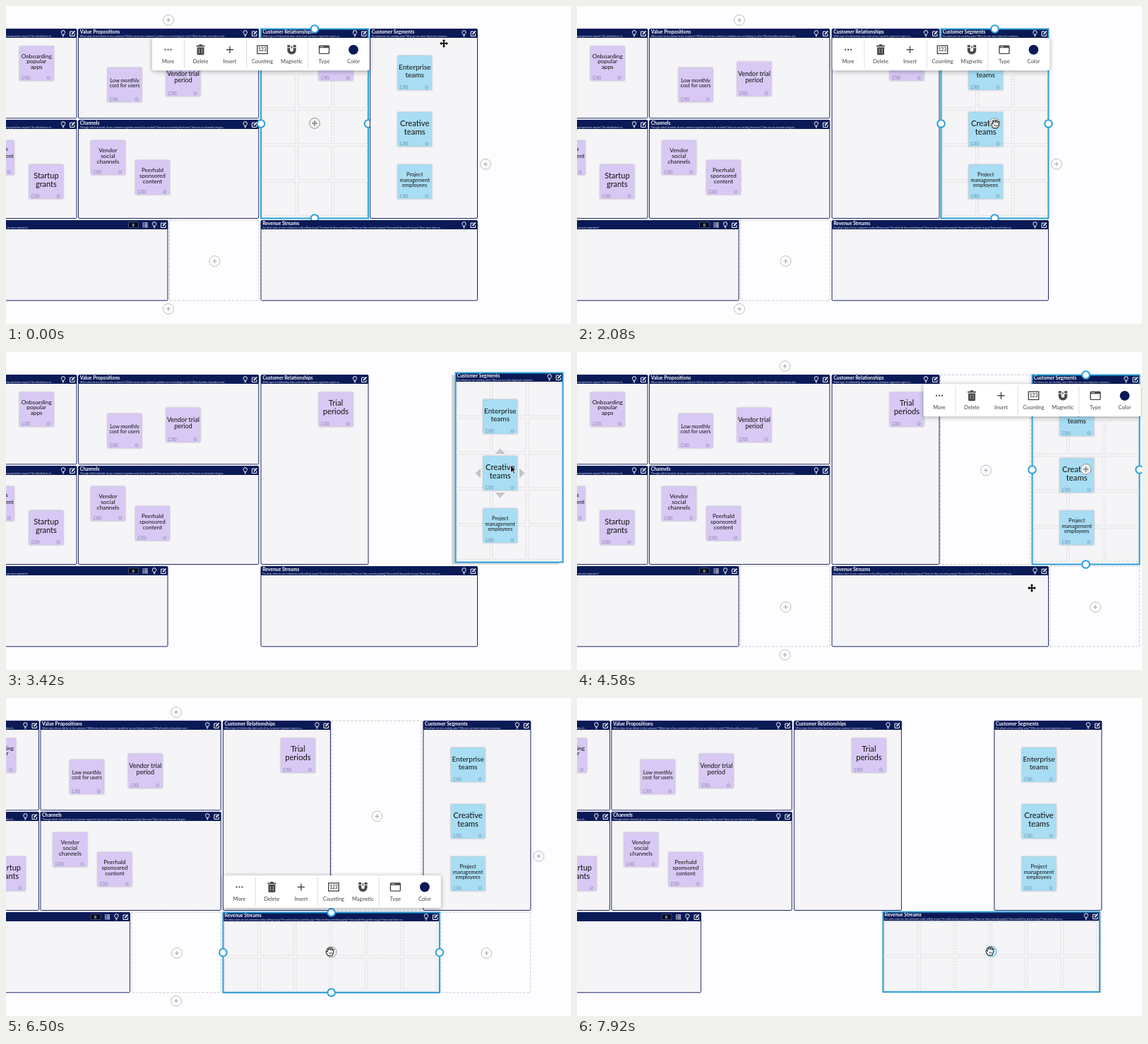
Animation of 800 by 450 pixels, one loop 8 s. Source, as an HTML page:

```html
<!DOCTYPE html>
<html lang="en">
<head>
<meta charset="utf-8">
<title>Business model board</title>
<style>
  html, body { margin: 0; width: 100%; height: 100%; overflow: hidden; background: #fdfcfe; }
  svg { display: block; width: 800px; height: 450px; font-family: Lato, "Open Sans", sans-serif; }
  .body { fill: #f5f4f6; stroke: #1c2766; }
  .head { fill: #0a1a57; }
  .title { font-size: 6.8px; font-weight: 700; fill: #fff; }
  .sub { font-size: 3.4px; fill: #dfe2ef; }
  .cell { fill: none; stroke: #d3d2d6; stroke-width: .8; stroke-dasharray: 2.4 1.6; }
  .slot { fill: none; stroke: #c6c4ca; stroke-width: .9; stroke-dasharray: 3.5 2; }
  .note { filter: drop-shadow(0 .6px 1px rgba(40, 30, 70, .4)); }
  .note-text { fill: #111; text-anchor: middle; }
  .mini { fill: none; stroke: rgba(50, 50, 90, .38); stroke-width: .7; }
  .outline { fill: none; stroke: #2ba0d8; stroke-width: 2; }
  .handle { fill: #fff; stroke: #2ba0d8; stroke-width: 2; }
  .add { fill: #fdfcfe; stroke: #b5b4ba; stroke-width: .9; }
  .grip { fill: #f0f0f1; stroke: #88888d; stroke-width: .9; }
  .dragging .grip { fill: #c9eaf8; stroke: #2ba0d8; }
  .bar { fill: #fff; filter: drop-shadow(0 1px 3px rgba(0, 0, 0, .35)); }
  .label { font-size: 7.5px; fill: #444; text-anchor: middle; }
  .tool { fill: #4a4a4c; }
  .line { fill: none; stroke: #4a4a4c; stroke-width: 1.4; }
  .white { fill: none; stroke: #fff; stroke-width: 1; }
</style>
</head>
<body>
<svg id="stage" viewBox="0 0 800 450">
  <defs>
    <g id="bulb" class="white">
      <path d="M-1.2 1.6C-1.2.7-2.7.1-2.7-1.5A2.7 2.7 0 0 1 2.7-1.5C2.7.1 1.2.7 1.2 1.6Z"/>
      <path d="M-1.2 3H1.2M-.7 4.2H.7"/>
    </g>
    <g id="edit" class="white">
      <path d="M.8-2.8H-3.4V3.6H3V.2"/>
      <path d="M-1 1.2L3.4-3.4" stroke-width="1.7"/>
    </g>
    <g id="list" class="white">
      <path d="M-3.4-2.6H-2M-3.4 0H-2M-3.4 2.6H-2M-1-2.6H3.5M-1 0H3.5M-1 2.6H3.5" stroke-width="1.6"/>
      <path d="M1-3.5V3.5" stroke="#0a1a57" stroke-width=".6"/>
    </g>
    <g id="plus"><circle class="add" r="7.4"/><path d="M-3 0H3M0-3V3" stroke="#a4a3a9"/></g>
    <path id="cross" d="M0-6L2.4-3.3H.9V-.9H3.3V-2.4L6 0L3.3 2.4V.9H.9V3.3H2.4L0 6L-2.4 3.3H-.9V.9H-3.3V2.4L-6 0L-3.3-2.4V-.9H-.9V-3.3H-2.4Z"/>
  </defs>
  <g id="world">
    <g id="board"></g>
    <g id="before"></g>
    <g id="after"></g>
    <rect id="drop" fill="#d2d2d5"/>
    <g id="moving"></g>
    <g id="toolbar"></g>
  </g>
  <g id="cursor">
    <use data-kind="move" href="#cross" fill="#111" stroke="#fff" stroke-width="1.2" paint-order="stroke"/>
    <g data-kind="hand">
      <path d="M-3 6.3L-5.9 1.5Q-6.6-.3-5-.5L-3.5 1L-4.6-3.3Q-4.2-5-3-4L-2-1.5L-2.1-5Q-1-6.7 0-5L.3-1.5L1.2-4.8Q2.5-5.9 2.9-4.3L2.6-1L3.8-3Q5.3-3.5 5-2L4.4 2.6L3 6.3Z" fill="#fff" stroke="#111" stroke-linejoin="round"/>
      <path d="M-1 1.5V4M.7 1.5V4M2.3 1.5V4" stroke="#111" stroke-width=".7"/>
    </g>
    <path data-kind="arrow" d="M0-4V7L2.5 4.7L4.2 8.5L6 7.7L4.3 4H7.6Z" fill="#111" stroke="#fff" stroke-width=".8"/>
    <g data-kind="pointer">
      <path d="M-2.6-5.4Q-1.5-6.6-.5-5.4V-1.6L3.4-.8Q5.2-.3 4.8 1.8L4 6.4H-1.6L-4.6 2Q-4.8.4-3.2.8L-2.2 1.6Z" fill="#fff" stroke="#111" stroke-linejoin="round"/>
      <path d="M-.2 2.4V5M1.3 2.4V5M2.8 2.4V5" stroke="#111" stroke-width=".7"/>
    </g>
  </g>
</svg>
<script>
const $ = id => document.getElementById(id);
const range = n => [...Array(n).keys()];
const use = (id, x, y) => `<use href="#${id}" x="${x}" y="${y}"/>`;
const rect = (cls, x, y, w, h, more = '') =>
  `<rect class="${cls}" x="${x}" y="${y}" width="${w}" height="${h}" ${more}/>`;

const PURPLE = '#d7c8f4', BLUE = '#a8ddf3';

function note(x, y, fill, size, lead, ...lines) {
  const text = lines.map((line, i) => {
    const base = y + 21.7 + (i - (lines.length - 1) / 2) * lead + size * .33;
    return `<text class="note-text" x="${x + 24.2}" y="${base}" font-size="${size}">${line}</text>`;
  }).join('');
  return rect('note', x, y, 48.4, 48.4, `fill="${fill}"`) + text +
    `<g class="mini" transform="translate(${x} ${y + 44.5})">
      <path d="M4-2H9V1.5H6.5L4 2.6ZM10.3-2H14.3V2H10.3ZM11.3 0H13.3"/>
      <circle cx="41.3" r="2.2"/><path d="M40.3 0L41.1.8L42.4-.7"/></g>`;
}

// Panels without a title run off the left edge, so their text is anchored at its end.
function panel({ x, y, w, h, title = '', sub, subEnd, cells, notes = '', extra = '' }) {
  const right = x + w, mid = y + 6.4;
  const caption = subEnd
    ? `<text class="sub" x="${subEnd}" y="${y + 11.3}" text-anchor="end">${sub}</text>`
    : `<text class="sub" x="${x + 2.2}" y="${y + 11.3}">${sub}</text>`;
  const grid = cells ? `<g class="grid">${range(cells[0] * cells[1]).map(i =>
    rect('cell', x + 2 + i % cells[0] * 50.7, y + 13.6 + Math.floor(i / cells[0]) * 50.8, 47, 47)).join('')}</g>` : '';
  const cx = x + w / 2, cy = y + h / 2;
  const select = cells ? `<g class="select">${rect('outline', x, y, w, h)}
    <g class="grip-group" transform="translate(${cx} ${cy - .6})"><circle class="grip" r="7.4"/>
      <use href="#cross" fill="#77777c" transform="scale(.65)"/></g>
    <g class="handles">${[[cx, y], [x, cy], [right, cy], [cx, y + h]].map(([a, b]) =>
      `<circle class="handle" cx="${a}" cy="${b}" r="5.3"/>`).join('')}</g></g>` : '';
  return rect('body', x, y, w, h, 'rx="1.5"') + rect('head', x, y, w, 12.6, 'rx="1"') +
    `<text class="title" x="${x + 2.2}" y="${y + 6.7}">${title}</text>` + caption +
    use('bulb', right - 19, mid) + use('edit', right - 6, mid) + extra + grid + notes + select;
}

const counter = rect('', 173.5, 305.7, 14, 8, 'rx="1" fill="#060b20" stroke="#6a739c" stroke-width=".6"') +
  '<text class="title" x="178.7" y="311.8" font-size="5" style="font-size:5px">0</text>' + use('list', 197, 309.9);

const relations = { x: 361, y: 32.5, w: 152, h: 268, cells: [3, 5], title: 'Customer Relationships',
  sub: 'What type of relationship does each of our customer segments expect us...',
  notes: note(442.8, 57, PURPLE, 11.2, 11.8, 'Trial', 'periods') };
const segments = { x: 515.5, y: 32.5, w: 152, h: 268, cells: [3, 5], title: 'Customer Segments',
  sub: 'For whom are we creating value? Who are our most important customer...',
  notes: note(554.5, 70.3, BLUE, 10.1, 11, 'Enterprise', 'teams') +
    note(554.5, 150.3, BLUE, 11.3, 11.6, 'Creative', 'teams') +
    note(554.5, 224.5, BLUE, 7.5, 7.5, 'Project', 'management', 'employees') +
    '<path id="arrows" fill="#c4c4c9" d="M571.7 147H585.7L578.7 139.5ZM571.7 202H585.7L578.7 209.5ZM551 167.5V181.5L543.5 174.5ZM606 167.5V181.5L613.5 174.5Z"/>' };
const revenue = { x: 361, y: 303.5, w: 306.5, h: 113.3, cells: [6, 2], title: 'Revenue Streams',
  sub: 'For what value are our customers really willing to pay? For what do they currently pay? How are they currently paying? How would they prefer to pay? How much does ea...' };
const keySub = 'What key activities do our value propositions require? Our distribution ch...';

$('board').innerHTML = [
  { x: -155, y: 32.5, w: 255, h: 126.3, sub: keySub, subEnd: 66,
    notes: note(19, 57, PURPLE, 8.3, 7.9, 'Onboarding', 'popular', 'apps') },
  { x: -155, y: 161.5, w: 255, h: 139, sub: keySub, subEnd: 66,
    notes: note(-37, 190.4, PURPLE, 8.2, 10, 'Business', 'development', '') +
      note(32.7, 224.4, PURPLE, 11, 11.8, 'Startup', 'grants') },
  { x: 102.5, y: 32.5, w: 255.3, h: 126.3, title: 'Value Propositions',
    sub: "What value do we deliver to the customer? Which one of our customer's problems are we helping to solve? What bundles of products and...",
    notes: note(143.8, 87.4, PURPLE, 7.3, 7.6, 'Low monthly', 'cost for users') +
      note(226.7, 79, PURPLE, 9, 9.2, 'Vendor trial', 'period') },
  { x: 102.5, y: 161.5, w: 255.3, h: 139, title: 'Channels',
    sub: 'Through which channels do our customer segments want to be reached? How are we reaching them now? How are our channels integrat...',
    notes: note(120.2, 190.4, PURPLE, 8.3, 7.8, 'Vendor', 'social', 'channels') +
      note(183.3, 218.4, PURPLE, 8.1, 7.8, 'Peerhald', 'sponsored', 'content') },
  { x: -80, y: 303.5, w: 309, h: 113.3, extra: counter, subEnd: 31,
    sub: 'Which key resources are most expensive?' },
].map(panel).join('') + `<g id="relations">${panel(relations)}</g>`;
$('moving').innerHTML = `<g id="segments">${panel(segments)}</g><g id="revenue">${panel(revenue)}</g>`;

const firstSlot = rect('slot', 231.5, 303, 126.5, 113.8) + use('plus', 295.5, 361);
const edgeAdds = (middle, right) => use('plus', middle, 20) + use('plus', middle, 428.6) + use('plus', right, 223.8);
$('before').innerHTML = firstSlot + edgeAdds(230, 679);
$('after').innerHTML = firstSlot + edgeAdds(294.5, 808) +
  rect('slot', 514.5, 32.2, 127, 268.5) + use('plus', 579, 167.4) +
  rect('slot', 669.7, 303, 126.6, 113.8) + use('plus', 734, 361);

const tools = [
  ['More', 22.5, '<path class="tool" d="M-5-1H-3V1H-5ZM-1-1H1V1H-1ZM3-1H5V1H3Z"/>'],
  ['Delete', 68.5, '<path class="tool" d="M-6-6H-2.5L-1.8-7.5H1.8L2.5-6H6V-4.3H-6ZM-5-3.4H5V6Q5 7.4 3.6 7.4H-3.6Q-5 7.4-5 6Z"/><path d="M-2-1.5V5M2-1.5V5" stroke="#aaa"/>'],
  ['Insert', 110, '<path class="line" d="M-5 0H5M0-5V5"/>'],
  ['Counting', 156, '<rect class="line" x="-7.2" y="-5.6" width="14.4" height="11.2"/><text class="label" y="2.4" style="font-size:6.6px;font-weight:700">123</text>'],
  ['Magnetic', 197.5, '<path fill="none" stroke="#4a4a4c" stroke-width="4" d="M-4.2-6.5V.6A4.2 4.2 0 0 0 4.2.6V-6.5"/><path d="M-6.5-3H-2M2-3H6.5" stroke="#fff"/><path class="tool" d="M.5-7L-1.4-3H0L-.6 0L1.5-4H.2Z"/>'],
  ['Type', 243.5, '<rect class="line" x="-7" y="-5.4" width="14" height="11" rx="1"/><path class="tool" d="M-7-6H7V-2.5H-7Z"/><path d="M-5.5-4.2H-1" stroke="#fff" stroke-width=".8"/>'],
  ['Color', 285, '<circle r="6.9" fill="#0a1a57"/>'],
];
$('toolbar').innerHTML = rect('bar', 0, 0, 308, 46, 'rx="3"') +
  '<path d="M45.5 3V43M133.7 3V43M220.3 3V43" stroke="#dedde1"/>' +
  tools.map(([name, x, icon]) => `<g transform="translate(${x} 16.5)">${icon}<text class="label" y="19.5">${name}</text></g>`).join('');

const LOOP = 8000, DROP = 3600, SNAP = 12.9, LEAD = 60;
const panels = { relations, segments, revenue };
const segmentDrag = [[2200, 0, 0], [2500, 53, -1], [2950, 108, -3], [3250, 121, -3], [3420, 121, -3], [DROP, 124, -2]];
const revenueDrag = [[6850, 0, 0], [7170, 83, -1.5], [7580, 114, -1], [7820, 126, -.8]];
const cursorPath = [
  [120, 620, 53], [560, 606, 125], [1100, 592.5, 166.5], [DROP, 592.5, 166.5], [DROP, 716, 166],
  [3900, 716, 166], [4480, 644, 334], [4720, 644, 334], [5150, 575, 345], [5300, 575, 345],
  [5560, 608, 315], [5800, 608, 315], [6400, 459, 358.5],
];
const cursorKinds = [[0, 'move'], [1000, 'hand'], [3300, 'arrow'], [DROP, 'hand'], [3950, 'move'],
  [5450, 'pointer'], [5850, 'move'], [6300, 'hand']];

const linear = p => p, smooth = p => p * p * (3 - 2 * p);

function at(keys, t, ease = linear) {
  const next = keys.findIndex(k => k[0] > t);
  if (next === 0) return keys[0].slice(1);
  if (next < 0) return keys.at(-1).slice(1);
  const a = keys[next - 1], b = keys[next];
  const p = ease((t - a[0]) / (b[0] - a[0]));
  return [1, 2].map(i => a[i] + (b[i] - a[i]) * p);
}

const show = (el, on) => { el.style.display = on ? '' : 'none'; };
const place = (el, x, y) => el.setAttribute('transform', `translate(${x} ${y})`);

function render(t) {
  const selected = t < 520 ? 'relations' : t < 5280 ? 'segments' : 'revenue';
  const kind = cursorKinds.findLast(k => k[0] <= t)[1];
  const early = t >= 2200 && t < DROP, dragging = early || t >= 6850;
  const offsets = {
    relations: [0, 0],
    segments: t < DROP ? at(segmentDrag, t) : [10 * SNAP, 0],
    revenue: at(revenueDrag, t),
  };
  const camera = at([[4640, 0, 0], [5000, -53.6, 0]], t, smooth)[0];
  place($('world'), camera, 0);

  for (const name in panels) {
    const group = $(name);
    place(group, ...offsets[name]);
    group.classList.toggle('dragging', dragging);
    show(group.querySelector('.grid'), name === selected);
    show(group.querySelector('.select'), name === selected);
    show(group.querySelector('.handles'), !dragging);
    show(group.querySelector('.grip-group'), kind !== 'arrow');
  }
  show($('arrows'), kind === 'arrow');
  show($('before'), !dragging && t < DROP);
  show($('after'), !dragging && t >= DROP);

  const box = panels[selected], shift = offsets[selected], drop = $('drop');
  show(drop, dragging);
  drop.setAttribute('x', box.x - .5 + Math.round(shift[0] / SNAP) * SNAP);
  drop.setAttribute('y', box.y);
  drop.setAttribute('width', box.w);
  drop.setAttribute('height', box.h);

  show($('toolbar'), !dragging);
  place($('toolbar'), box.x + box.w + shift[0] - 306, selected === 'revenue' ? 251 : 45.3);

  const lead = t < DROP ? at(segmentDrag, Math.min(t + LEAD, DROP - 1)) : at(revenueDrag, t + LEAD);
  const [x, y] = at(cursorPath, t, smooth);
  place($('cursor'), x + lead[0], y + lead[1]);
  for (const el of $('cursor').children) show(el, el.dataset.kind === kind);
}

const start = performance.now();
function tick() {
  render((performance.now() - start) % LOOP);
  requestAnimationFrame(tick);
}
tick();
</script>
</body>
</html>
```
